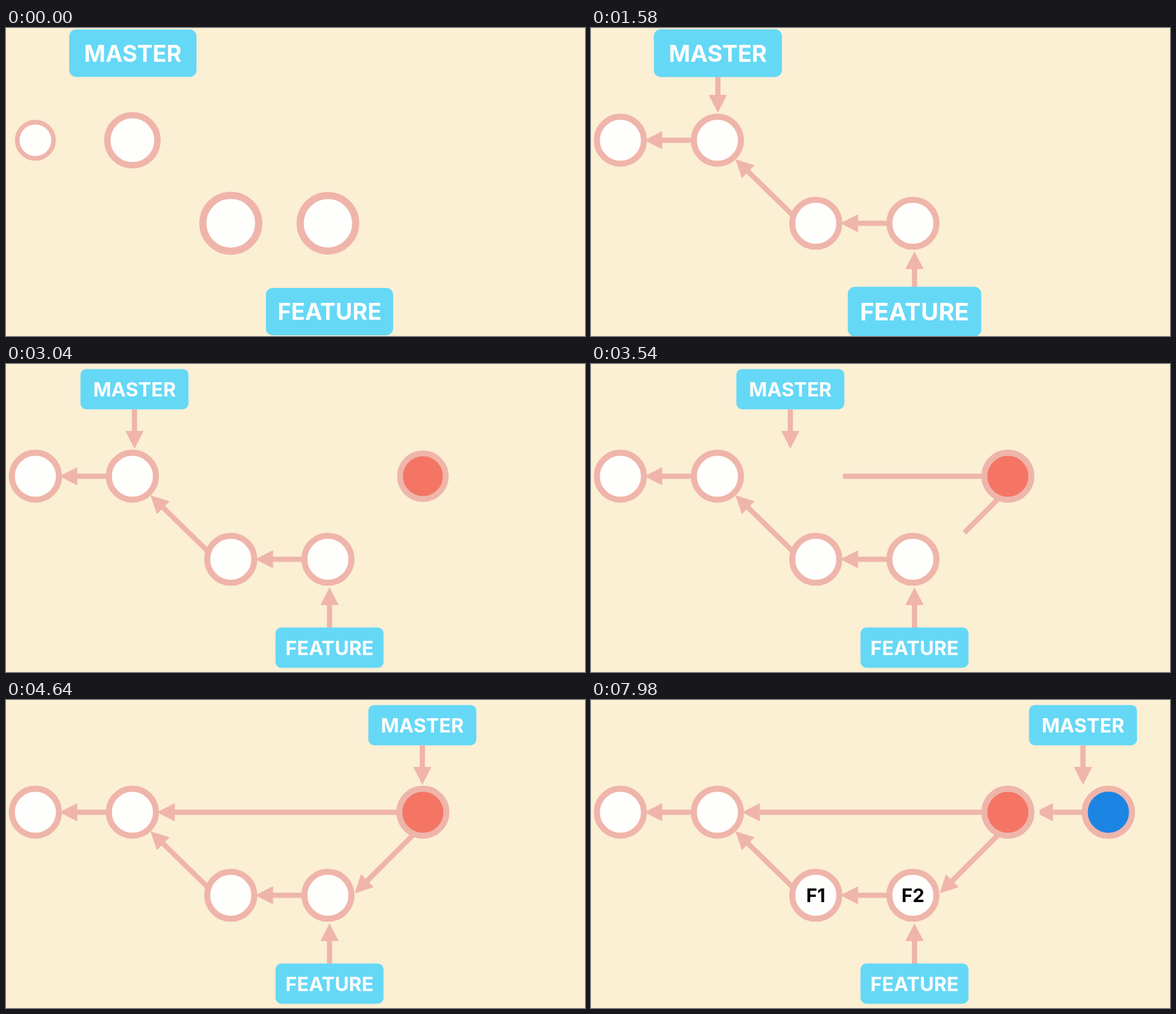
Recreate the animation shown at these times as an HTML page. Size 890 px wide and 474 px high, loop 8000 ms.

```html
<!DOCTYPE html>
<html lang="en">
<head>
<meta charset="utf-8">
<title>Merging a feature branch</title>
<style>
  html, body { margin: 0; width: 100%; height: 100%; overflow: hidden; background: #fbefd4; }
  svg { display: block; width: 890px; height: 474px; }
  .commit { stroke: #efb5aa; stroke-width: 9.3; }
  .arrow { fill: #efb5aa; }
  .label { fill: #65d8f6; }
  text { font: 700 30px Inter, "Open Sans", sans-serif; text-anchor: middle; fill: #fefefd; }
  .name { font-size: 29px; fill: #000; }
</style>
</head>
<body>
<svg id="stage" viewBox="0 0 890 474"></svg>
<script>
const LOOP = 8000;
const TOP = 172.7, LOW = 300.5;
const COLUMNS = [45.2, 194.3, 345.5, 494.8, 640.8, 795.3];
const WHITE = '#fefefd';
const stage = document.getElementById('stage');
const updates = [];

function add(parent, tag, attrs = {}, text = '') {
  const el = document.createElementNS('http://www.w3.org/2000/svg', tag);
  for (const key in attrs) el.setAttribute(key, attrs[key]);
  if (text) el.textContent = text;
  return parent.appendChild(el);
}

const progress = (t, start, time) => Math.min(1, Math.max(0, (t - start) / time));
const easeOut = x => 1 - (1 - x) ** 2.5;
const easeInOut = x => x < .5 ? 8 * x ** 4 : 1 - 8 * (1 - x) ** 4;

// Damped spring from 0 to 1 that overshoots to about 1.2
function spring(t, start) {
  const angle = Math.max(0, t - start) * Math.PI / 300;
  return 1 - Math.exp(-.57 * angle) * Math.cos(angle);
}

// Single swell that fades back to 0
function swell(t, start) {
  const x = Math.max(0, t - start) / 350;
  return .32 * (x * Math.exp(1 - x)) ** 2;
}

function scaled(parent, x, y, scaleAt) {
  const g = add(parent, 'g');
  updates.push(t => g.setAttribute('transform', `translate(${x} ${y}) scale(${scaleAt(t)})`));
  return g;
}

// Uncovered from tail to tip
function arrow(parent, x1, y1, x2, y2, start) {
  const length = Math.hypot(x2 - x1, y2 - y1);
  const angle = Math.atan2(y2 - y1, x2 - x1) * 180 / Math.PI;
  const neck = length - 27.5;
  const path = add(parent, 'path', {
    class: 'arrow',
    transform: `translate(${x1} ${y1}) rotate(${angle})`,
    d: `M0-4H${neck}V-14L${length} 0L${neck} 14V4H0Z`
  });
  updates.push(t => {
    const hidden = 100 * (1 - easeOut(progress(t, start, 1000)));
    path.style.clipPath = `inset(0 ${hidden}% 0 0)`;
  });
}

function commit(x, y, fill, start) {
  const g = scaled(stage, x, y, t => spring(t, start));
  add(g, 'circle', { class: 'commit', r: 36.2, fill });
}

function name(x, text, start) {
  const g = scaled(stage, x, LOW, t => spring(t, start));
  add(g, 'text', { class: 'name', y: 10.5 }, text);
}

function label(parent, x, y, text, swellStart) {
  const g = scaled(parent, x, y, t => spring(t, -287) + swell(t, swellStart));
  add(g, 'rect', { class: 'label', x: -83, y: -31, width: 166, height: 62, rx: 9 });
  add(g, 'text', { y: 11 }, text);
}

const FIRST = 620, MERGE = 3245, NEXT = 7370;
arrow(stage, 158, TOP, 82, TOP, FIRST);
arrow(stage, 309, 287, 222, 202, FIRST);
arrow(stage, 459, LOW, 383, LOW, FIRST);
arrow(stage, 497.3, 406, 497.3, 343.5, FIRST);
arrow(stage, 604, TOP, 232, TOP, MERGE);
arrow(stage, 627, 206.5, 536, 297.5, MERGE);
arrow(stage, 757, TOP, 682.5, TOP, NEXT);

COLUMNS.slice(0, 4).forEach((x, i) => commit(x, i < 2 ? TOP : LOW, WHITE, -107 - 60 * i));
commit(COLUMNS[4], TOP, '#f47564', 2450);
commit(COLUMNS[5], TOP, '#1c84e3', 7065);
name(COLUMNS[2], 'F1', 5330);
name(COLUMNS[3], 'F2', 5700);

const master = add(stage, 'g');
arrow(master, 195, 70, 195, 130.5, FIRST);
label(master, 195, 38.7, 'MASTER', 905);
label(stage, 497.3, 436.5, 'FEATURE', 1000);
updates.push(t => {
  const x = 445 * easeInOut(progress(t, 2724, 1940)) + 155 * easeInOut(progress(t, 7252, 1256));
  master.setAttribute('transform', `translate(${x} 0)`);
});

function render(now) {
  const t = now % LOOP;
  updates.forEach(update => update(t));
}

let origin;
function frame(now) {
  origin ??= now;
  render(now - origin);
  requestAnimationFrame(frame);
}
render(0);
requestAnimationFrame(frame);
</script>
</body>
</html>
```
